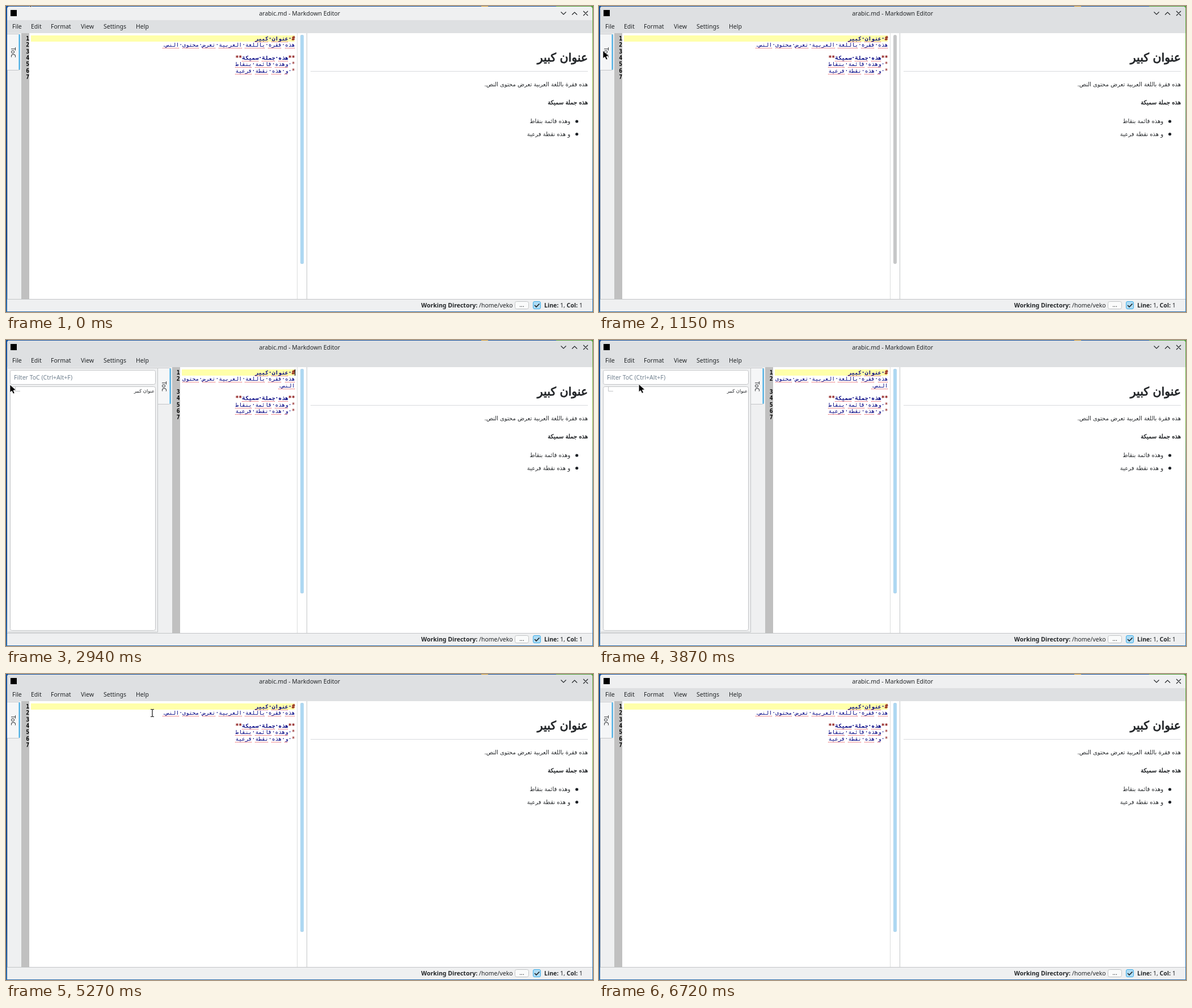
An HTML page that plays this animation: 1035 by 541 pixels, repeating every 6.84 s.

```html
<!DOCTYPE html>
<html lang="en">
<head>
<meta charset="utf-8">
<title>Markdown Editor</title>
<style>
  html, body { margin: 0; width: 100%; height: 100%; overflow: hidden; }
  body { position: relative; background: #fff; }
  svg { position: absolute; left: 0; top: 0; width: 1035px; height: 541px; }
  text { font: 10.5px "Noto Sans", sans-serif; fill: #232629; }
  .bold { font-weight: 700; }
  .middle { text-anchor: middle; }
  .arabic { font-family: "DejaVu Sans", sans-serif; font-size: 10px; direction: rtl; }
  .heavy { stroke: #232629; stroke-width: .045em; }
  .line { stroke: #c3c5c7; fill: none; }
  .icon { stroke: #232629; stroke-width: 1.2; fill: none; }
  .row, .number {
    position: absolute; height: 11px; white-space: pre;
    font: 9.7px/11px "DejaVu Sans Mono", monospace;
  }
  .row { right: 525.5px; direction: rtl; color: #000080; }
  .row.strong, .number { font-weight: 700; }
  .row i { font-style: normal; color: #800000; }
  .row u { text-decoration: underline dotted #e0202a 1px; text-underline-offset: 2px; text-decoration-skip-ink: none; }
  .number { width: 14px; text-align: right; color: #000; }
  .margin, .current { position: absolute; }
  .margin { top: 48px; width: 14px; height: 470px; background: #c0c0c0; }
  .current { top: 52px; height: 11px; right: 526px; background: #ffffaa; }
</style>
</head>
<body>
<svg viewBox="0 0 1035 541">
  <defs>
    <linearGradient id="wall" x2="0" y2="1">
      <stop stop-color="#124f9c"/><stop offset=".8" stop-color="#0d3f86"/><stop offset="1" stop-color="#2a6cae"/>
    </linearGradient>
    <linearGradient id="wallRight" x2="0" y2="1">
      <stop stop-color="#58a83a"/><stop offset=".25" stop-color="#7fb83c"/><stop offset=".6" stop-color="#1b5aa4"/><stop offset="1" stop-color="#2f7ab8"/>
    </linearGradient>
  </defs>

  <!-- desktop and window -->
  <rect width="1035" height="541" fill="url(#wall)"/>
  <rect x="1030" width="5" height="541" fill="url(#wallRight)"/>
  <rect x="838" width="12" height="3" fill="#d29a2c"/>
  <rect x="970" width="65" height="4" fill="#4d9e37"/>
  <path d="M2 540V5q0-4 4-4H1030q4 0 4 4V540Z" fill="#eff0f1"/>
  <path id="titleDark" d="M2 25V5q0-4 4-4H1030q4 0 4 4V25Z" fill="#dee0e2"/>
  <rect id="menuDark" x="2" y="25" width="1032" height="23" fill="#dee0e2"/>
  <rect x="8" y="7" width="11" height="11" fill="#000"/>
  <text class="middle" x="517.7" y="17">arabic.md - Markdown Editor</text>
  <path class="icon" d="M978.5 10.5l4.5 4.5 4.5-4.5M998 15.5l4.5-4.5 4.5 4.5M1018 9l8 8m0-8l-8 8"/>
  <g id="menu"></g>

  <!-- editor and preview -->
  <rect x="27" y="48" width="1007" height="470" fill="#fff"/>
  <path class="line" d="M513.5 48V518" stroke-opacity=".6"/>
  <path class="line" d="M530.5 48V518M2 518.5H1034"/>
  <rect class="handle" x="519" y="51" width="6" rx="3" fill="#c6c7c8"/>
  <rect class="handle" id="handleBlue" x="519" y="51" width="6" rx="3" fill="#aed8f2"/>
  <text class="arabic heavy" x="1026" y="98" style="font-size:20.4px">عنوان كبير</text>
  <path d="M537 115.5H1026" stroke="#d8dadd"/>
  <text class="arabic" x="1026" y="142">هذه فقرة باللغة العربية تعرض محتوى النص.</text>
  <text class="arabic heavy" x="1026" y="174">هذه جملة سميكة</text>
  <text class="arabic" x="995" y="207">وهذه قائمة بنقاط</text>
  <text class="arabic" x="995" y="230">و هذه نقطة فرعية</text>
  <circle cx="1006.5" cy="204" r="2.6" fill="#1f2328"/>
  <circle cx="1006.5" cy="226.5" r="2.6" fill="#1f2328"/>

  <!-- side panel -->
  <rect x="2" y="48" width="25" height="470" fill="#eff0f1"/>
  <g id="panel">
    <rect x="2" y="48" width="291" height="470" fill="#eff0f1"/>
    <path class="line" d="M3 49.5H267.5V516.5H3"/>
    <rect class="line" x="7.5" y="53.5" width="256" height="25" rx="3" style="fill:#fff"/>
    <text x="14" y="70" style="fill:#70808f">Filter ToC (Ctrl+Alt+F)</text>
    <rect class="line" x="7.5" y="82.5" width="256" height="431" rx="3" style="fill:#fff"/>
    <path class="line" d="M16.5 83V90.5H25"/>
    <text class="arabic" x="262" y="93" style="font-size:8.3px">عنوان كبير</text>
  </g>
  <path id="rail" class="line" d="M2.5 113V518"/>
  <g id="tab">
    <path class="line" d="M2 49.5H21.5q3 0 3 3V110.5q0 3-3 3H2" style="fill:#f5f6f7"/>
    <rect id="tabBlue" x="22.5" y="50" width="2" height="63" rx="1" fill="#3daee9"/>
    <text class="middle" transform="translate(9.2 82) rotate(90)">ToC</text>
  </g>

  <!-- status bar -->
  <text class="bold" x="732" y="533">Working Directory:</text>
  <text x="834" y="533">/home/veko</text>
  <rect class="line" x="897.5" y="522.5" width="24" height="13" rx="3" style="fill:#fafbfb"/>
  <text class="middle" x="909.5" y="532">...</text>
  <rect x="929.5" y="522.5" width="13" height="13" rx="2.5" fill="#fafbfb" stroke="#e3e5e7"/>
  <rect id="checkBlue" x="929.5" y="522.5" width="13" height="13" rx="2.5" fill="#aedcf5" stroke="#3daee9"/>
  <path class="icon" d="M932 529l3 3 5.5-5.5" style="stroke-width:1.7"/>
  <text x="949" y="533"><tspan class="bold">Line:</tspan> 1, <tspan class="bold">Col:</tspan> 1</text>
</svg>

<div id="wide"></div>
<div id="narrow"></div>

<svg viewBox="0 0 1035 541">
  <rect id="caret" x="509" y="52" width="1.2" height="11"/>
  <path id="arrow" d="M0 0V13.6L3.3 11 5.7 16 8.1 14.9 5.9 10.1 10.4 9.6Z" stroke="#fff" stroke-width=".7"/>
  <path id="beam" d="M-3-6.5H-1L0-5.8 1-6.5H3M0-5.8V5.8M-3 6.5H-1L0 5.8 1 6.5H3" fill="none" stroke="#111" stroke-width="1.2"/>
</svg>

<script>
const LOOP = 6840, LINE = 11.33;
const ACTIVATE = 1110, OPEN = 1190, CLOSE = 4800, DEACTIVATE = 6720;
const $ = id => document.getElementById(id);
const show = (id, on) => { $(id).style.display = on ? '' : 'none'; };
const fade = (id, amount) => { $(id).style.opacity = amount; };

const menu = { File: 11, Edit: 44, Format: 79, View: 132, Settings: 172, Help: 229 };
$('menu').innerHTML = Object.entries(menu)
  .map(([label, x]) => `<text x="${x}" y="40">${label}</text>`).join('');

// Each source line is a list of visual rows.
const heading = ['# عنوان كبير'], strong = ['**هذه جملة سميكة**'];
const bullets = [['* وهذه قائمة بنقاط'], ['* و هذه نقطة فرعية'], ['']];
const start = 'هذه فقرة باللغة العربية تعرض محتوى', end = 'النص.';

function markup(text) {
  return text.replace(/ /g, '·').replace(/[#*]+|[^#*·]+/g,
    part => /[#*]/.test(part) ? `<i>${part}</i>` : `<u>${part}</u>`);
}

function buildEditor(id, left, paragraph) {
  let row = 0;
  let html = `<div class="margin" style="left:${left}px"></div>
    <div class="current" style="left:${left + 17}px"></div>`;
  [heading, paragraph, [''], strong, ...bullets].forEach((rows, index) => {
    const top = () => Math.round(52 + row * LINE);
    html += `<div class="number" style="left:${left}px;top:${top()}px">${index + 1}</div>`;
    const weight = rows === heading || rows === strong ? 'strong' : '';
    for (const text of rows) {
      html += `<div class="row ${weight}" style="top:${top()}px">${markup(text)}</div>`;
      row++;
    }
  });
  $(id).innerHTML = html;
}
buildEditor('wide', 27, [start + ' ' + end]);
buildEditor('narrow', 292.5, [start, end]);

// Pointer keys: time, x, y
const pointer = [
  [0, 37, -14], [100, 37, -14], [101, 37, -30], [689, 37, -30],
  [690, 32, 6], [850, 22, 46], [970, 11, 72], [1070, 7, 79],
  [3409, 7, 79], [3410, 9, 73], [3690, 9, 73], [3900, 80, 79], [4200, 235, 78], [4400, 281, 76],
  [4959, 281, 76], [4960, 278, 78], [5010, 273, 78], [5269, 273, 78], [5270, 258, 69],
  [5710, 258, 69], [6060, 80, -18], [LOOP, 80, -18]
];
const caretOn = [[OPEN, 1590], [1980, 2520], [2940, 3730], [3950, 4400], [4960, 5270], [5750, 6230]];

const ramp = (t, from, to) => Math.min(1, Math.max(0, (t - from) / (to - from)));
const between = (t, from, to) => t >= from && t < to;

function pointerAt(t) {
  const next = Math.max(1, pointer.findIndex(key => key[0] > t));
  const [t0, x0, y0] = pointer[next - 1], [t1, x1, y1] = pointer[next];
  const k = ramp(t, t0, t1);
  return [x0 + (x1 - x0) * k, y0 + (y1 - y0) * k];
}

function draw(t) {
  const open = between(t, OPEN, CLOSE);
  const active = t >= ACTIVATE ? 1 : 1 - ramp(t, 60, 240);
  fade('titleDark', between(t, ACTIVATE, DEACTIVATE) ? 1 : 0);
  for (const id of ['menuDark', 'tabBlue', 'checkBlue']) fade(id, active);
  fade('handleBlue', t < ACTIVATE ? active : ramp(t, 1550, 1730));

  show('panel', open);
  show('rail', !open);
  show('narrow', open);
  show('wide', !open);
  $('tab').setAttribute('transform', `translate(${open ? 266 : 0} 0)`);
  for (const handle of document.querySelectorAll('.handle'))
    handle.setAttribute('height', open ? 397 : 405);

  show('caret', caretOn.some(([from, to]) => between(t, from, to)));
  const [x, y] = pointerAt(t);
  const overText = t >= 4960 && y > 48;
  show('beam', overText);
  show('arrow', !overText);
  for (const id of ['arrow', 'beam'])
    $(id).setAttribute('transform', `translate(${x} ${y})`);
}

function tick() {
  draw(performance.now() % LOOP);
  requestAnimationFrame(tick);
}
tick();
</script>
</body>
</html>
```
